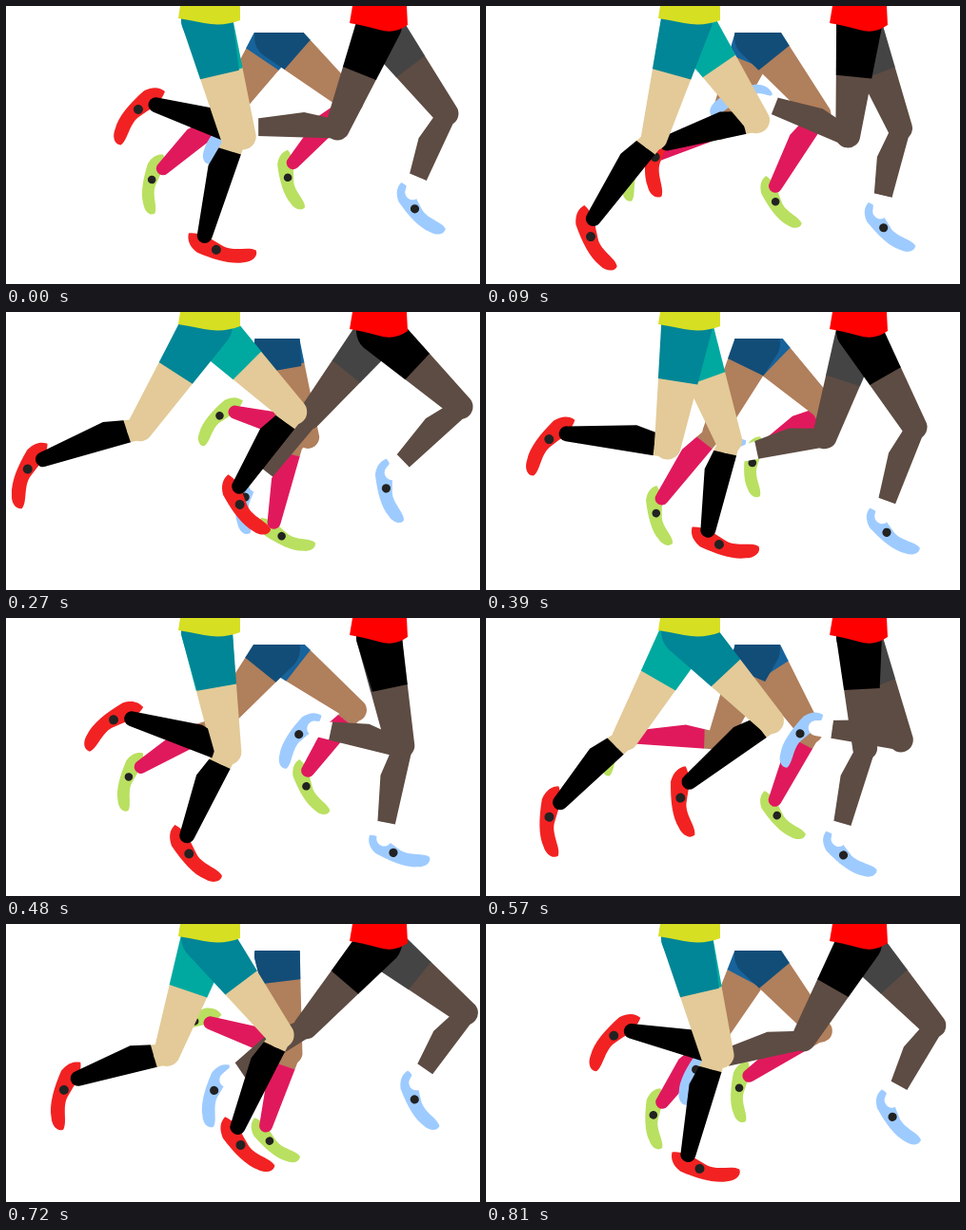
An HTML page with a canvas for the animation above (0.84 s loop, 498 by 293 pixels).

```html
<!DOCTYPE html>
<html lang="en">
<head>
<meta charset="utf-8">
<title>Runners</title>
<style>
html, body { margin: 0; width: 100%; height: 100%; overflow: hidden; background: #fff; }
canvas { display: block; }
</style>
</head>
<body>
<canvas id="stage" width="498" height="293"></canvas>
<script>
const ctx = document.getElementById('stage').getContext('2d');
const LOOP = 840, STEP = 30, RAD = Math.PI / 180;
const times = [0, 150, 270, 390, 480, 570, 720, 810];

// Each pose holds the thigh, calf and foot angles in degrees, one per key time.
const runners = [
  {
    hip: [285, 33], waist: 28, thigh: 104, hem: 28, hipR: 24, kneeR: 12, calfR: 10, ankleR: 7,
    skin: '#b07f5c', sock: '#e0195d', sockFrom: () => 15, shoe: '#b9e060', shoeScale: .86,
    legs: [
      { calf: 81, shorts: '#17639b', poses: [[124, 140, 96], [102, 169, 113], [72, 199, 128], [44, 150, 88],
        [38, 128, 57], [57, 118, 44], [82, 109, 38], [118, 129, 86]] },
      { calf: 89, shorts: '#124d78', poses: [[41, 134, 71], [60, 115, 40], [80, 104, 22], [116, 128, 72],
        [129, 151, 102], [113, 182, 118], [83, 201, 148], [50, 148, 90]] }
    ]
  },
  {
    hip: [392, 20], waist: 0, thigh: 117, hem: 55, hipR: 24, kneeR: 13, calfR: 11, ankleR: 8,
    skin: '#5d4c43', sock: '#fff', sockFrom: len => len - 17, shoe: '#9ecbff', shoeScale: .92,
    shirt: { color: '#f00', path: 'M364 0H421L422 20Q408 30 392 25Q374 20 361 18Z' },
    legs: [
      { calf: 90, shorts: '#444', poses: [[53, 113, 44], [82, 102, 45], [129, 128, 93], [108, 168, 114],
        [80, 192, 121], [68, 188, 122], [39, 125, 58], [48, 119, 50]] },
      { calf: 100, shorts: '#000', poses: [[112, 180, 128], [83, 203, 160], [43, 136, 72], [60, 110, 36],
        [78, 101, 18], [87, 106, 35], [131, 146, 102], [120, 166, 115]] }
    ]
  },
  {
    hip: [211, 14], waist: 0, thigh: 129, hem: 60, hipR: 27, kneeR: 14, calfR: 12, ankleR: 8,
    skin: '#e3ca98', sock: '#000', sockFrom: () => 14, shoe: '#f22222', shoeScale: 1,
    shirt: { color: '#d7df23', path: 'M183 0H246V15Q228 22 208 18Q194 15 181 13Z' },
    legs: [
      { calf: 97, shorts: '#00a9a0', poses: [[73, 200, 127], [46, 144, 70], [45, 126, 50], [70, 103, 14],
        [81, 115, 45], [120, 135, 88], [109, 164, 102], [74, 195, 127]] },
      { calf: 107, shorts: '#008696', poses: [[77, 107, 12], [121, 140, 88], [123, 162, 109], [99, 187, 124],
        [80, 199, 138], [47, 143, 80], [53, 115, 42], [77, 105, 12]] }
    ]
  }
];

const shoeShape = new Path2D('M-17 1C-9 -2 4 0 10 3L22 7C34 10 48 1 56 4C60 10 54 17 46 19C34 24 16 23 -4 19C-14 14 -17 8 -17 1Z');
for (const { shirt } of runners) if (shirt) shirt.shape = new Path2D(shirt.path);

// Periodic cubic interpolation through the key poses.
function poseAt(poses, t) {
  const n = times.length;
  const time = i => times[(i + n) % n] + LOOP * Math.floor(i / n);
  const pose = i => poses[(i + n) % n];
  let i = n - 1;
  while (times[i] > t) i--;
  const span = time(i + 1) - time(i), u = (t - time(i)) / span;
  return pose(i).map((from, k) => {
    const slope = j => (pose(j + 1)[k] - pose(j - 1)[k]) / (time(j + 1) - time(j - 1)) * span;
    const to = pose(i + 1)[k], v = 1 - u;
    return from * (1 + 2 * u) * v * v + slope(i) * u * v * v
      + to * u * u * (3 - 2 * u) - slope(i + 1) * u * u * v;
  });
}

function fill(color, build) {
  ctx.fillStyle = color;
  ctx.beginPath();
  build();
  ctx.fill();
}

function at([x, y], degrees, draw) {
  ctx.save();
  ctx.translate(x, y);
  ctx.rotate(degrees * RAD);
  draw();
  ctx.restore();
}

const along = ([x, y], degrees, len) =>
  [x + len * Math.cos(degrees * RAD), y + len * Math.sin(degrees * RAD)];

function drawShoe(r) {
  ctx.scale(r.shoeScale, r.shoeScale);
  ctx.fillStyle = r.shoe;
  ctx.fill(shoeShape);
  fill('#222', () => ctx.arc(15, 12, 5, 0, 7));
}

function drawCalf(r, len) {
  const { calfR: w, ankleR: a } = r, start = r.sockFrom(len);
  const part = (color, x, width) => {
    ctx.save();
    ctx.beginPath();
    ctx.rect(x, -40, width, 80);
    ctx.clip();
    fill(color, () => {
      ctx.moveTo(0, -w);
      ctx.lineTo(0, w * .8);
      ctx.lineTo(35, w * 1.5);
      ctx.lineTo(len, a);
      ctx.arc(len, 0, a, Math.PI / 2, -Math.PI / 2, true);
    });
    ctx.restore();
  };
  part(r.skin, 0, start + .5);
  part(r.sock, start, len);
}

function drawThigh(r, shorts) {
  const { thigh, hem, hipR, kneeR } = r, q = Math.PI / 2;
  const hemR = hipR + (kneeR - hipR) * hem / thigh;
  fill(r.skin, () => {
    ctx.moveTo(hem - 1, -hemR);
    ctx.arc(thigh, 0, kneeR, -q, q);
    ctx.lineTo(hem - 1, hemR);
  });
  fill(shorts, () => {
    ctx.arc(0, 0, hipR, q, -q);
    ctx.lineTo(hem, -hemR);
    ctx.lineTo(hem, hemR);
  });
}

function drawLeg(r, leg, t) {
  const [thigh, calf, foot] = poseAt(leg.poses, t);
  const knee = along(r.hip, thigh, r.thigh);
  const ankle = along(knee, calf, leg.calf);
  at(ankle, foot, () => drawShoe(r));
  at(knee, calf, () => drawCalf(r, leg.calf));
  at(r.hip, thigh, () => drawThigh(r, leg.shorts));
}

function render(now) {
  const t = Math.floor(now % LOOP / STEP) * STEP;
  ctx.fillStyle = '#fff';
  ctx.fillRect(0, 0, 498, 293);
  for (const r of runners) {
    ctx.save();
    ctx.beginPath();
    ctx.rect(0, r.waist, 498, 293);
    ctx.clip();
    for (const leg of r.legs) drawLeg(r, leg, t);
    ctx.restore();
    if (r.shirt) {
      ctx.fillStyle = r.shirt.color;
      ctx.fill(r.shirt.shape);
    }
  }
}

const begin = performance.now();
function tick() {
  render(performance.now() - begin);
  requestAnimationFrame(tick);
}
tick();
</script>
</body>
</html>
```
